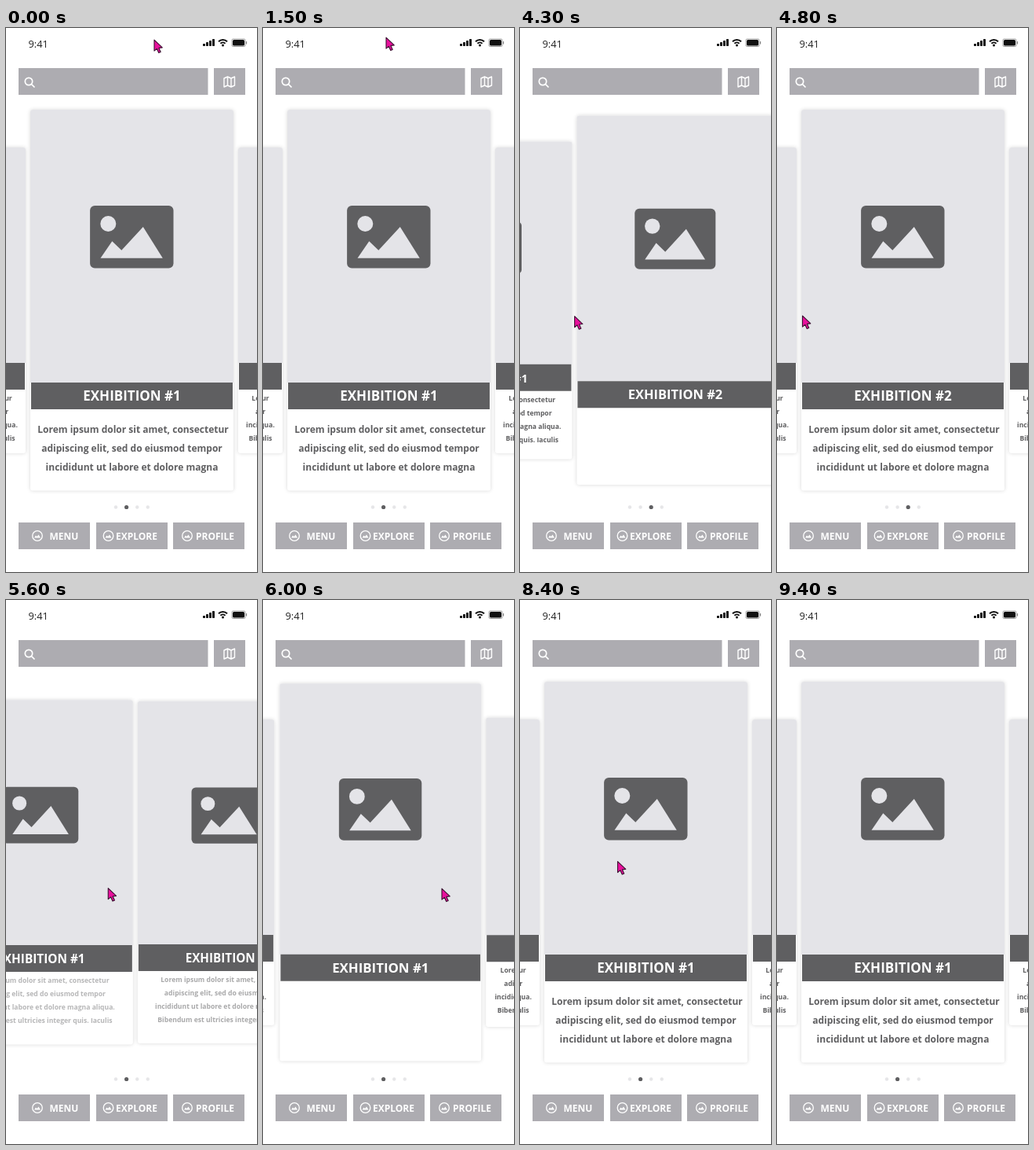
An HTML page with a canvas that plays this animation: 320x692 px, repeating every 9500 ms.

```html
<!DOCTYPE html>
<html lang="en">
<head>
<meta charset="utf-8">
<style>
html, body { margin: 0; height: 100%; overflow: hidden; background: #fff; }
canvas { display: block; }
</style>
</head>
<body>
<canvas id="stage" width="320" height="692"></canvas>
<script>
const ctx = document.getElementById('stage').getContext('2d');
const LOOP = 9500, STEP = 100;
const DARK = '#5f5f61', GREY = '#adacb1', PALE = '#e4e4e8';
const BODY = [
  'Lorem ipsum dolor sit amet, consectetur',
  'adipiscing elit, sed do eiusmod tempor',
  'incididunt ut labore et dolore magna',
  'Bibendum est ultricies integer quis. Iaculis'
];
const MENU = ['EXPLORE', 'EVENTS', 'CAFE', 'SHOP', 'ABOUT', 'SETTING'];
const CURSOR = [ // time, x, y
  [0, 188, 14], [1500, 156, 11], [2000, 190, 110], [3000, 269, 369], [3700, 269, 369],
  [4500, 31.5, 365], [5200, 31.5, 365], [6000, 227, 366], [6200, 231, 367],
  [6900, 61, 650], [8000, 61, 650], [8800, 186, 13]
];

const clamp = v => Math.max(0, Math.min(1, v));
const mix = (a, b, k) => a + (b - a) * k;
const span = (t, a, b) => clamp((t - a) / (b - a));
const smooth = k => k * k * (3 - 2 * k);
const easeOut = k => 1 - (1 - k) ** 3;

function rect(x, y, w, h, color, radius = 0) {
  ctx.fillStyle = color;
  ctx.beginPath();
  ctx.roundRect(x, y, w, h, radius);
  ctx.fill();
}

function disc(x, y, r, color) {
  ctx.fillStyle = color;
  ctx.beginPath();
  ctx.arc(x, y, r, 0, 7);
  ctx.fill();
}

function text(str, x, y, size, color, align = 'center', weight = 700) {
  ctx.font = `${weight} ${size}px "Open Sans", sans-serif`;
  ctx.textAlign = align;
  ctx.fillStyle = color;
  ctx.fillText(str, x, y);
}

function shape(d, x, y, fill, stroke, width = 1) {
  const path = new Path2D(d);
  ctx.save();
  ctx.translate(x, y);
  if (fill) { ctx.fillStyle = fill; ctx.fill(path); }
  if (stroke) {
    ctx.strokeStyle = stroke;
    ctx.lineWidth = width;
    ctx.lineJoin = 'round';
    ctx.stroke(path);
  }
  ctx.restore();
}

function faded(alpha, draw) {
  if (alpha <= 0) return;
  ctx.save();
  ctx.globalAlpha = alpha;
  draw();
  ctx.restore();
}

function picture(x, y, scale) {
  ctx.save();
  ctx.translate(x, y);
  ctx.scale(scale, scale);
  rect(-53.2, -39.7, 106.4, 79.4, DARK, 6);
  disc(-30, -16.7, 10, PALE);
  shape('M-39.8 27L-25 5.5L-13 17L14.5 -12.8L39.5 27Z', 0, 0, PALE);
  ctx.restore();
}

function card(number, offset) {
  const d = Math.min(1, Math.abs(offset));
  const x = 160.5 + offset * 240;
  const w = mix(259, 209, d), left = x - w / 2;
  const top = mix(104, 152, d), bottom = mix(588.5, 541, d);
  const bar = mix(451, 426, smooth(d));

  ctx.save();
  ctx.shadowColor = 'rgba(0,0,0,.16)';
  ctx.shadowBlur = 5;
  rect(left, top, w, bottom - top, '#fff', 3);
  ctx.restore();

  rect(left, top, w, bar - top, PALE, [3, 3, 0, 0]);
  picture(x - .2, mix(265.7, 282, d), mix(1, .8, d));
  rect(left + 1, bar, w - 2, 34, DARK);
  text('EXHIBITION #' + number, x, bar + 23, mix(17, 13.6, d), '#fff');

  // Wrapped lines keep their trailing space, which nudges them left.
  faded(1 - d / .04, () => {
    for (let i = 0; i < 3; i++) text(BODY[i], x + (i ? 0 : 1.5), 515.4 + i * 24, 12, DARK);
  });
  faded(clamp((d - .3) / .4), () => BODY.forEach((line, i) =>
    text(i === 2 ? line + ' aliqua.' : line, x, bar + 48 + i * 17, 8.6, DARK)));
}

function statusBar() {
  text('9:41', 28.5, 24.5, 12.8, '#222', 'left', 400);
  for (let i = 0; i < 4; i++) rect(251 + i * 4, 20 - i * 2, 3, 3 + i * 2, '#111', .7);
  ctx.strokeStyle = '#111';
  ctx.lineWidth = 2;
  for (const r of [4.3, 7.8]) {
    ctx.beginPath();
    ctx.arc(276.5, 22.8, r, -2.36, -.78);
    ctx.stroke();
  }
  disc(276.5, 21.9, 1.5, '#111');
  shape('M1.5 0H15.5Q17 0 17 1.5V8Q17 9.5 15.5 9.5H1.5Q0 9.5 0 8V1.5Q0 0 1.5 0Z', 288, 14, null, '#888', .8);
  rect(289, 15, 15, 7.5, '#111', 1.5);
  rect(305.8, 17, 1.3, 3.5, '#888', .6);
}

function searchRow() {
  rect(16, 51, 241.5, 34, GREY);
  rect(265, 51, 40, 34, GREY);
  shape('M4.7 0A4.7 4.7 0 1 1 -4.7 0A4.7 4.7 0 1 1 4.7 0M3.4 3.4L7.5 7.5', 29, 68, null, '#fff', 1.7);
  shape('M0 2L4.5 0L9 2L13.5 0V11L9 13L4.5 11L0 13ZM4.5 0V11M9 2V13', 278, 62, null, '#fff', 1.4);
}

function button(x, label, iconX, labelX) {
  rect(x, 629, 91, 34, GREY);
  shape('M6.3 0A6.3 6.3 0 1 1 -6.3 0A6.3 6.3 0 1 1 6.3 0Z', iconX, 646, null, '#fff', 1.3);
  shape('M-4 2.5L-2 -.5L-.5 1L1.5 -1.5L4 2.5Z', iconX, 646, '#fff');
  text(label, labelX, 650.5, 12, '#fff', 'left');
}

function menu() {
  MENU.forEach((label, i) => {
    const y = 420 + i * 35;
    rect(16, y, 91, 33.5, 'rgba(95,95,97,.76)');
    text(label, 61.5, y + 21, 12, '#fff');
  });
}

function cursor(t) {
  if (t > 8800) return;
  const i = CURSOR.findIndex((k, n) => n && t <= k[0]);
  const [t0, x0, y0] = CURSOR[i - 1], [t1, x1, y1] = CURSOR[i];
  const k = smooth(span(t, t0, t1));
  const x = mix(x0, x1, k), y = mix(y0, y1, k);
  if (t >= 2400 && t < 3700) {
    shape('M5 9.5V2Q5 .7 6.2 .7Q7.4 .7 7.4 2V6.5L12.3 7.4Q14.2 7.8 14 9.7L13.2 13.6Q12.8 15.5 11 15.5H7.6Q6.3 15.5 5.5 14.5L1.2 10.3Q.4 8.8 2 8.6Z',
      x - 7, y, '#fff', '#333', 1.2);
    shape('M9.2 7V9M11.2 7.4V9.3', x - 7, y, null, '#333', .8);
  } else {
    shape('M.5 .5V14.5L3.8 11.7L6.2 17L8.7 15.9L6.4 10.8L10.8 10.3Z', x + .5, y + .6, '#e8109c', '#3a1030', 1.1);
  }
}

function draw(t) {
  const slide = smooth(span(t, 3700, 4500)) - easeOut(span(t, 5400, 6330));
  rect(0, 0, 320, 692, '#fff');
  statusBar();
  searchRow();
  for (const n of [-1, 0, 1, 2]) card((n + 4) % 4 + 1, n - slide);
  for (let i = 0; i < 4; i++) {
    const active = i === 1 + Math.round(slide);
    disc(140 + i * 13.6, 609.5, active ? 2.6 : 2.2, active ? DARK : '#e6e6e8');
  }
  button(16, 'MENU', 40, 55.5);
  button(115, 'EXPLORE', 130.5, 140);
  button(213, 'PROFILE', 231, 242);
  faded(span(t, 6900, 7200) - span(t, 8000, 8300), menu);
  cursor(t);
}

function tick(now) {
  draw(Math.floor(now % LOOP / STEP) * STEP);
  requestAnimationFrame(tick);
}
requestAnimationFrame(tick);
</script>
</body>
</html>
```
